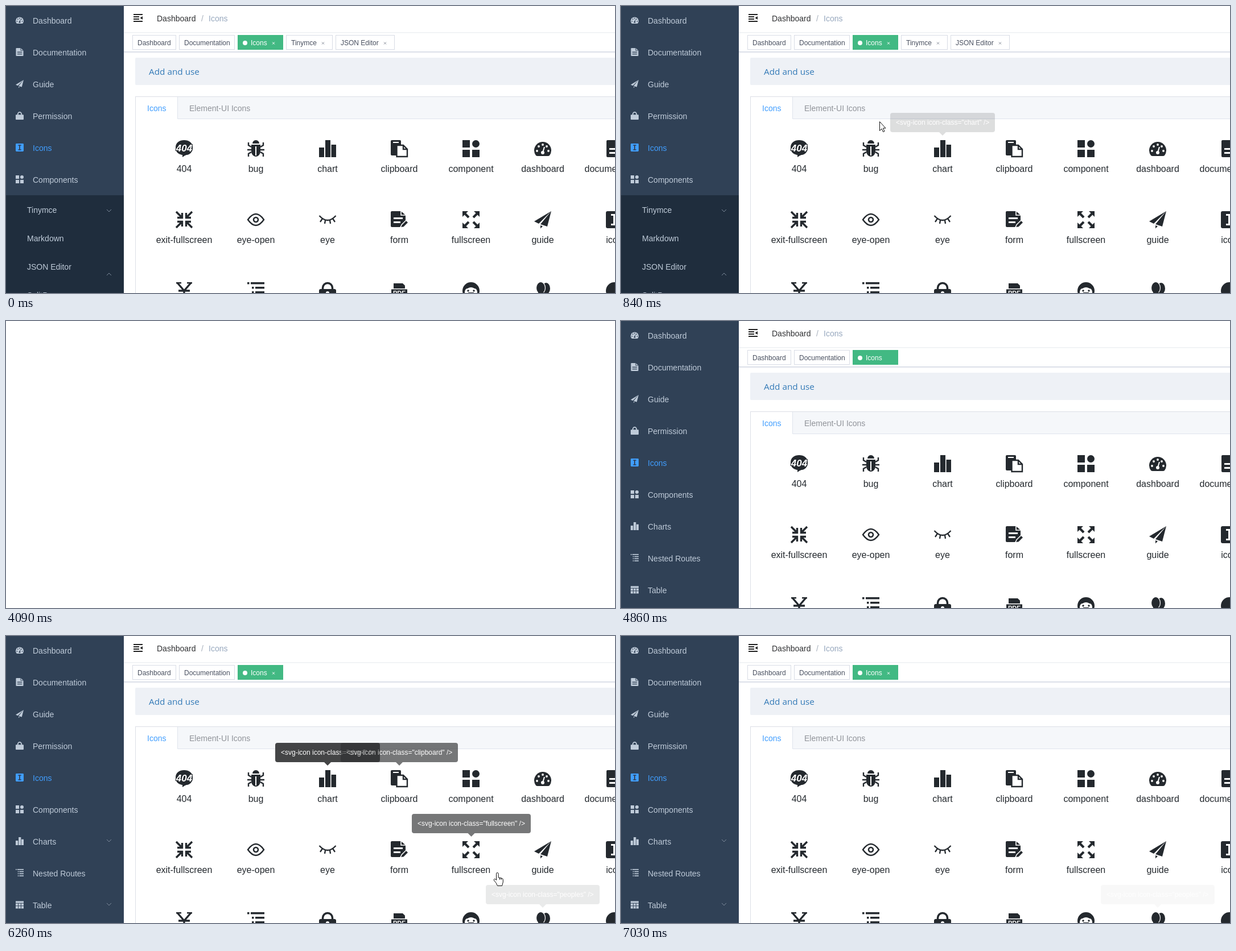
An HTML page that plays this animation: 1070x505 px, repeating every 8.12 s.

```html
<!DOCTYPE html>
<html lang="en">
<head>
<meta charset="utf-8">
<title>Icons</title>
<style>
html, body { margin: 0; width: 100%; height: 100%; overflow: hidden; background: #fff; }
svg { display: block; --hole: #fff; font: 14px "Liberation Sans", Arial, sans-serif; }
.h { fill: var(--hole); }
.s { fill: none; stroke: currentColor; }
.grid { color: #24292e; fill: currentColor; font-size: 16px; text-anchor: middle; }
.side { --hole: #304156; color: #bfcbd9; fill: currentColor; }
.active { color: #409eff; }
.chev { fill: none; stroke: #7d8a9b; }
.tag { font-size: 12px; fill: #495060; }
.tip { font-size: 12px; fill: #fff; }
</style>
</head>
<body>
<svg id="stage" width="1070" height="505" viewBox="0 0 1070 505"></svg>
<script>
const LOOP = 8120;
const rect = (x, y, w, h, more = '') => `<rect x="${x}" y="${y}" width="${w}" height="${h}" ${more}/>`;
const path = (d, more = '') => `<path d="${d}" ${more}/>`;
const line = (d, w) => path(d, `class="s" stroke-width="${w}"`);
const hole = (x, y, w, h) => rect(x, y, w, h, 'class="h"');
const dot = (x, y, r, more = '') => `<circle cx="${x}" cy="${y}" r="${r}" ${more}/>`;
const text = (s, x, y, more = '') => `<text x="${x}" y="${y}" ${more}>${s.replace(/</g, '&lt;')}</text>`;
const corners = part => [0, 90, 180, 270].map(a => `<g transform="rotate(${a})">${part}</g>`).join('');
const mirror = part => part + `<g transform="scale(-1 1)">${part}</g>`;

// Each icon fills a box from -15 to 15
const icons = {
  '404': path('M-15-2C-15-11-8-15 0-15S15-11 15-2 9 11 4 11Q1 12-3 15V11C-10 10-15 6-15-2z') +
    text('404', 0, 5, 'class="h" font-size="17" font-weight="bold" font-style="italic" stroke="currentColor" stroke-width="2" paint-order="stroke"'),
  bug: path('M-6-9a6 6 0 0 1 12 0zM-8-7H8V5a8 9 0 0 1-16 0z') + hole(-1, -4, 2, 16) +
    mirror(line('M-8-3L-13-6V-11M-8 2H-15M-8 6L-13 9V14', 2.4)),
  chart: rect(-15, -2, 9, 17) + rect(-4, -15, 9, 30) + rect(6.5, -7, 8.5, 22),
  clipboard: rect(-15, -15, 18, 27, 'rx="2"') + hole(-11, -12, 10, 2) +
    path('M-4.5-6H7L14 1V14H-4.5z', 'class="h" stroke="currentColor" stroke-width="2.4"') + line('M7-6V1H14', 2.4),
  component: rect(-15, -15, 13, 13) + dot(8.5, -8.5, 6.5) + rect(-15, 2, 13, 13) + rect(2, 2, 13, 13),
  dashboard: path('M-12 12A15 15 0 1 1 12 12Q11 13 9 13H-9Q-11 13-12 12z') +
    [[-10, 4], [-7, -4], [0, -7], [7, -4], [10, 4]].map(p => dot(...p, 1.9, 'class="h"')).join('') +
    dot(0, 7, 3, 'class="h"') + path('M0 7L3-3', 'stroke="var(--hole)" stroke-width="2"'),
  documentation: path('M-12-15H4L14-6V13a2 2 0 0 1-2 2H-12a2 2 0 0 1-2-2V-13a2 2 0 0 1 2-2z') +
    path('M4-15V-6H14', 'fill="none" stroke="var(--hole)" stroke-width="2"') + hole(-9, -1, 18, 3) + hole(-9, 6, 18, 3),
  'exit-fullscreen': corners(line('M-14-14L-5-5M-3.5-12V-3.5H-12', 3.4)),
  'eye-open': line('M-14 0Q-7-10 0-10T14 0Q7 10 0 10T-14 0z', 2.4) + dot(0, 0, 4, 'class="s" stroke-width="2.6"'),
  eye: line('M-14.5-7Q0 9 14.5-7', 2.3) + mirror(line('M4 1L5 7M9-2L13 4', 2.3)),
  form: path('M-13-15H3L11-8V2L1 13H-13a2 2 0 0 1-2-2V-13a2 2 0 0 1 2-2z') +
    path('M3-15V-8H11', 'fill="none" stroke="var(--hole)" stroke-width="1.6"') +
    hole(-10, -4, 16, 3) + hole(-10, 3, 12, 3) +
    path('M2 14L4 9 12 1 16 5 8 13z', 'stroke="var(--hole)" stroke-width="1.5"'),
  fullscreen: corners(path('M-15-15H-5L-15-5z') + line('M-12-12L-4-4', 4)),
  guide: path('M15-15L-15 3-7 7zM15-15L-4 8 8 12zM-4 10V15.500L0 11.500z'),
  icon: rect(-15, -15, 30, 30, 'rx="3"') + hole(-6, -10, 12, 3) + hole(-2, -10, 4, 20) + hole(-6, 7, 12, 3),
  money: line('M-12-14L0 0 12-14M0-1V15M-10 0H10M-10 6H10', 3.4) + rect(-14, -15, 9, 2.5) + rect(5, -15, 9, 2.5),
  nested: rect(-15, -15, 3.5, 3.5) + rect(-9, -15, 24, 3.5) +
    [-7, 1, 9].map(y => rect(-7, y, 3.5, 3.5) + rect(-1, y, 16, 3.5)).join(''),
  password: line('M-8.500-2V-5a8.500 8.500 0 0 1 17 0V-2', 3.5) + rect(-15, -3, 30, 18, 'rx="3"') + dot(0, 4, 3, 'class="h"'),
  pdf: path('M-10-13H6L10-9V-4H-10z') + rect(-14, -2.500, 28, 15) +
    text('PDF', 0, 8, 'class="h" font-size="11" font-weight="bold"'),
  people: dot(0, 0, 15) + path('M-11 4Q-11-4-6-4Q0-8 6-4Q11-4 11 4Q11 12 0 12T-11 4z', 'class="h"') +
    dot(-5, 0, 1.7) + dot(5, 0, 1.7) + rect(-5, 3, 10, 1.5),
  peoples: '<ellipse cx="6" cy="-4" rx="7" ry="10"/>' +
    '<ellipse cx="-3.500" cy="-5" rx="8" ry="10.500" stroke="var(--hole)" stroke-width="1.200"/>' + path('M-8 3H10V15H-8z'),
  plain: dot(0, 0, 15),
  lock: line('M-7-1V-5a7 8 0 0 1 14 0V-1', 4) + rect(-15, -4, 30, 19, 'rx="2"'),
  table: rect(-15, -14, 30, 28) + hole(-15, -7, 30, 2) + hole(-15, 3, 30, 2) + hole(-6, -6, 2, 20) + hole(4, -6, 2, 20)
};
const icon = (name, x, y, k = 1) => `<use href="#i-${name}" transform="translate(${x} ${y}) scale(${k})"/>`;

const rows = [
  ['404', 'bug', 'chart', 'clipboard', 'component', 'dashboard', 'documentation'],
  ['exit-fullscreen', 'eye-open', 'eye', 'form', 'fullscreen', 'guide', 'icon'],
  ['money', 'nested', 'password', 'pdf', 'people', 'peoples', 'plain']
];
const menu = [
  ['Dashboard', 'dashboard'], ['Documentation', 'documentation'], ['Guide', 'guide'], ['Permission', 'lock'],
  ['Icons', 'icon'], ['Components', 'component'], ['Charts', 'chart'], ['Nested Routes', 'nested'], ['Table', 'table']
];

const menuItem = ([label, name], i) => `<g class="side ${label == 'Icons' ? 'active' : ''}">` +
  icon(name, 24, 25 + 56 * i, 14 / 30) + text(label, 47, 31 + 56 * i) + '</g>';
const chevron = (i, up) => path(`M177 ${190 + 56 * i + (up ? 4 : 0)}l4 ${up ? -4 : 4} 4 ${up ? 4 : -4}`, 'class="chev"');
const cross = (x, color) => path(`M${x - 2} 63.500l4 4m0-4l-4 4`, `stroke="${color}" fill="none"`);
const tag = (label, x, w, close) => rect(x + .5, 51.5, w - 1, 25, 'fill="#fff" stroke="#d8dce5"') +
  text(label, x + 9, 69, 'class="tag"') + (close ? cross(x + w - 17, '#8a909c') : '');

const page = rect(0, 0, 207, 505, 'fill="#304156"') +
  path('M224 15H240M224 19H234M224 23H234M224 27H240', 'stroke="#222" stroke-width="1.800"') + path('M240 18V24L235.500 21z', 'fill="#222"') +
  text('Dashboard', 265, 27, 'fill="#303133"') + text('/', 343, 27, 'fill="#a8b0bc"') + text('Icons', 356, 27, 'fill="#97a8be"') +
  rect(207, 46, 863, 1, 'fill="#eef0f3"') + rect(207, 47, 863, 1, 'fill="#f6f7f9"') +
  rect(207, 80, 863, 1, 'fill="#d3d8e3"') + rect(207, 81, 863, 1, 'fill="#e9ecf1"') + rect(207, 82, 863, 1, 'fill="#f6f7f9"') +
  tag('Dashboard', 222, 77) + tag('Documentation', 304, 98) +
  rect(407, 51, 80, 26, 'fill="#42b983"') + dot(420, 65, 4, 'fill="#fff"') + text('Icons', 430, 69, 'class="tag" style="fill:#fff"') +
  rect(227, 91, 850, 48, 'rx="2" fill="#eef1f6"') +
  text('Add and use', 251, 121, 'fill="#337ab7" style="font:15.300px \'Open Sans\',\'Noto Sans\',sans-serif"') +
  rect(227.5, 159.5, 850, 400, 'fill="#fff" stroke="#dcdfe6"') + rect(302, 160, 768, 38, 'fill="#f5f7fa"') +
  path('M301.500 160V198.500H1070', 'fill="none" stroke="#dfe4ed"') +
  text('Icons', 248, 185, 'fill="#409eff"') + text('Element-UI Icons', 322, 185, 'fill="#909399"') +
  '<g class="grid">' + rows.map((row, r) => row.map((name, c) =>
    icon(name, 313 + 126 * c, 251 + 125 * r) + (r < 2 ? text(name, 313 + 126 * c, 292 + 125 * r) : '')).join('')).join('') + '</g>' +
  menu.slice(0, 6).map(menuItem).join('');

const opened = rect(0, 333, 207, 172, 'fill="#1f2d3d"') +
  ['Tinymce', 'Markdown', 'JSON Editor', 'SplitPane'].map((s, i) => text(s, 37, 364 + 50 * i, 'fill="#bfcbd9"')).join('') +
  chevron(3) + chevron(5, true) + cross(470, '#fff') + tag('Tinymce', 492, 82, true) + tag('JSON Editor', 579, 104, true);
const closed = menu.slice(6).map((m, i) => menuItem(m, i + 6)).join('');
const late = [3, 5, 6, 7, 8].map(i => chevron(i)).join('') + cross(470, '#fff');

// Tooltips: name, centre, top, width and [time, opacity] points
const tips = [
  ['peoples', 943, 438, 200, [[30, 0], [215, .85], [360, .58], [600, 0], [6230, 0], [6412, .6], [6560, .9], [6720, .8], [7030, 0]]],
  ['fullscreen', 817.5, 313, 209, [[90, 0], [287, .6], [360, .42], [520, 0], [6150, 0], [6260, .66], [6412, .95], [6560, .9], [6960, 0]]],
  ['form', 691, 313, 182, [[142, 0], [360, .77], [432, .9], [505, .85], [720, 0]]],
  ['chart', 565, 188, 184, [[215, 0], [360, .82], [505, .95], [580, .9], [840, 0], [6020, 0], [6260, .9], [6336, .8], [6560, 0]]],
  ['clipboard', 691, 188, 206, [[6108, 0], [6260, .66], [6336, .85], [6412, .85], [6650, 0]]]
];
const tipShape = ([name, x, y, w]) => `<g id="tip-${name}">` +
  path(`M${x - w / 2 + 4} ${y}h${w - 8}q4 0 4 4v26q0 4-4 4H${x + 6}l-6 6-6-6H${x - w / 2 + 4}q-4 0-4-4v-26q0-4 4-4z`, 'fill="#303133"') +
  text(`<svg-icon icon-class="${name}" />`, x - w / 2 + 10, y + 21, 'class="tip"') + '</g>';

const moves = [
  [[70, 900, 452], [142, 817, 400], [215, 690, 362], [287, 570, 270], [360, 454, 203], [860, 454, 203], [1060, 380, 147], [1210, 215, 50], [1370, 20, -22]],
  [[5880, 215, 14], [6260, 863, 416], [6412, 960, 469]]
];

const $ = id => document.getElementById(id);
$('stage').innerHTML = '<defs>' + Object.entries(icons).map(([k, v]) => `<g id="i-${k}">${v}</g>`).join('') + '</defs>' +
  `<g id="page">${page}<g id="opened">${opened}</g><g id="closed">${closed}</g><g id="late">${late}</g></g>` +
  tips.map(tipShape).join('') +
  '<g id="cursor" fill="#fff" stroke="#111" stroke-linejoin="round">' +
  path('M.5.500V16.500L4 13 6.500 18.500 9 17.500 6.500 12H11z', 'id="arrow"') +
  path('M-1.500 12V2.300a1.800 1.800 0 0 1 3.600 0V9L8 10.200Q10.300 10.800 10.300 13V17L8.500 23.500H.5L-2 18.500-5.500 14Q-6.500 12.400-5 11.500-3.500 11-1.500 13.500zM4.500 9.500V13M7.200 10V13', 'id="hand"') + '</g>';

function at(keys, t) {
  const n = keys.findIndex(k => k[0] > t);
  if (n < 0) return keys.at(-1).slice(1);
  if (!n) return keys[0].slice(1);
  const a = keys[n - 1], b = keys[n], f = (t - a[0]) / (b[0] - a[0]);
  return a.slice(1).map((v, i) => v + (b[i + 1] - v) * f);
}
const show = (id, on) => $(id).style.display = on ? '' : 'none';
const snap = (t, from, step) => from + Math.floor((t - from) / step + 1e-6) * step;
const near = (v, centre, pitch, reach) => Math.abs(v - centre - pitch * Math.round((v - centre) / pitch)) < reach;

function draw(t) {
  const u = t < 910 ? snap(t, 70, 72.5) : t < 5880 ? snap(t, 910, 77) : snap(t, 5880, 76);
  show('page', t < 4090 || t >= 4860);
  show('opened', t < 4090);
  show('closed', t >= 4860);
  show('late', t >= 4950);
  for (const [name, , , , keys] of tips) $('tip-' + name).setAttribute('opacity', at(keys, u)[0]);
  const move = moves.find(m => u >= m[0][0] && u <= m.at(-1)[0]);
  show('cursor', move);
  if (!move) return;
  const [x, y] = at(move, u).map(Math.round);
  const over = x > 250 && y > 225 && near(x, 313, 126, 50) && near(y, 265, 125, 45);
  $('cursor').setAttribute('transform', `translate(${x} ${y})`);
  show('hand', over);
  show('arrow', !over);
}

let start;
function frame(now) {
  start ??= now;
  draw((now - start) % LOOP);
  requestAnimationFrame(frame);
}
draw(0);
requestAnimationFrame(frame);
</script>
</body>
</html>
```
